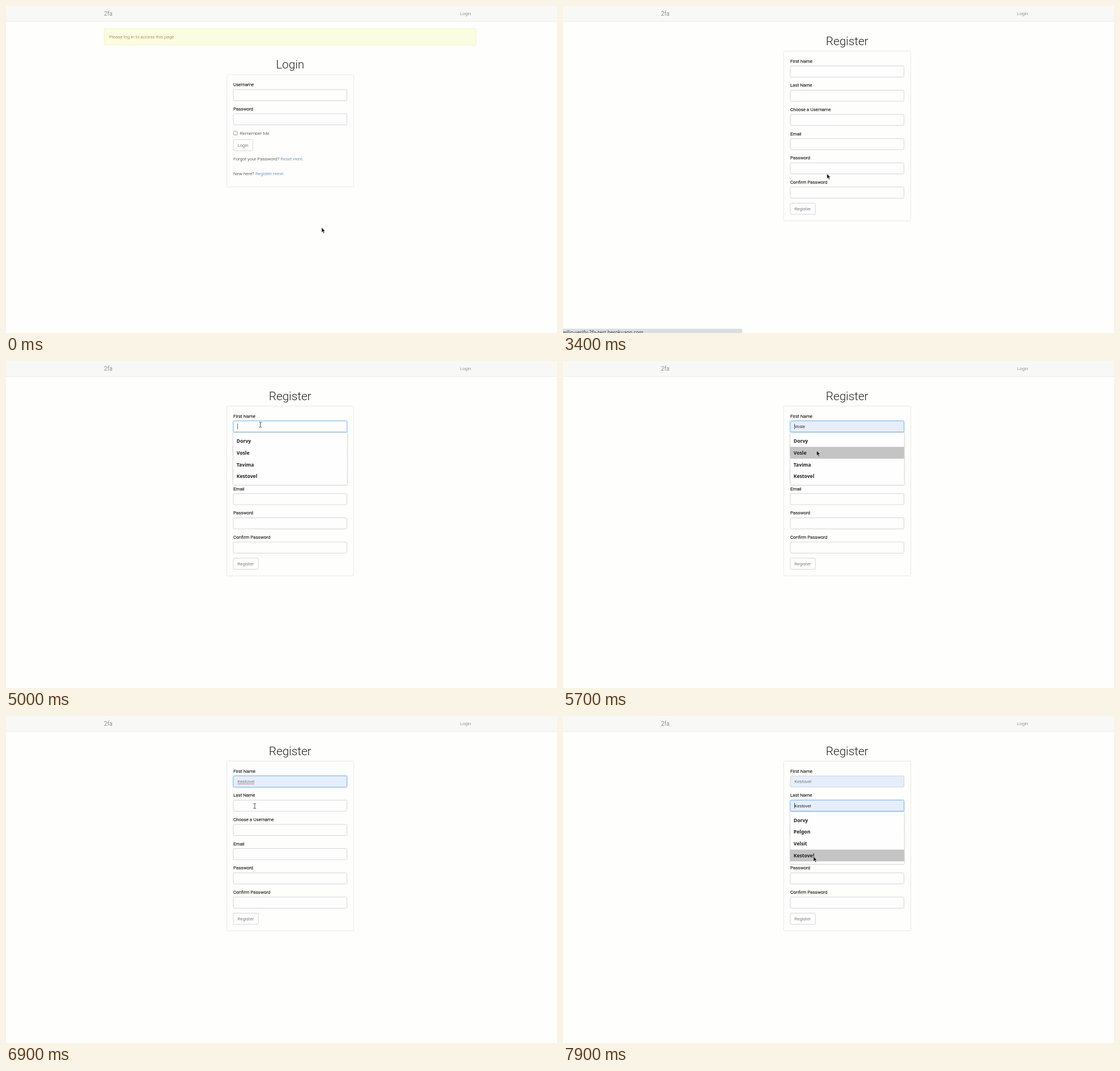
Write an HTML page that moves like this. It is 972 px wide and 576 px high and loops after 8 s.

```html
<!DOCTYPE html>
<html lang="en">
<head>
<meta charset="utf-8">
<title>Register</title>
<style>
html, body { margin: 0; width: 100%; height: 100%; overflow: hidden; background: #fefefd; }
svg { display: block; width: 972px; height: 576px; }
text { font: 300 8.06px Roboto, sans-serif; fill: #222; white-space: pre; }
.title { font-size: 20.7px; text-anchor: middle; }
.brand { font-size: 10.36px; fill: #666; }
.nav { fill: #666; }
.label { stroke: #222; stroke-width: .28px; }
.link { fill: #3b6c9f; }
.hover { fill: #23456a; text-decoration: underline; }
.notice { fill: #85683a; }
.value { fill: #444; }
.preview { font: 7.67px "Liberation Sans", Arial, sans-serif; }
.option { font: 700 8.6px "Noto Sans", "Open Sans", sans-serif; }
.status { font: 400 8.54px "Noto Sans", sans-serif; fill: #3c4043; }
.bar { fill: #f8f8f7; }
.alert { fill: #fafde0; stroke: #eef2c6; stroke-width: .8px; }
.panel { fill: none; stroke: #e4e4e3; stroke-width: .8px; }
.box { fill: #fefefe; stroke: #ccc; stroke-width: .8px; }
.check { fill: #fff; stroke: #777; stroke-width: .7px; }
.filled { fill: #e6eefb; }
.focus { stroke: #74b2e2; filter: drop-shadow(0 0 1.6px rgba(102, 175, 233, .6)); }
.menu { fill: #fefefe; filter: drop-shadow(0 .6px 1px rgba(0, 0, 0, .4)); }
.hot { fill: #c4c4c4; }
</style>
</head>
<body>
<svg id="stage" viewBox="0 0 972 576"></svg>
<script>
const LOOP = 8000, STEP = 100;
const LEFT = 401, WIDTH = 200.4, CENTER = 501.2, INSET = 7.2;
const FIELD_H = 19.6, PITCH = 42.65, ROW = 20.7;
const LOGIN_Y = 147.2, REGISTER_Y = 105.6;
const LABELS = ['First Name', 'Last Name', 'Choose a Username', 'Email', 'Password', 'Confirm Password'];
const CHOICE = 'Kestovel';
const HOST = 'twilio-verify-2fa-test.herokuapp.com';
const MENUS = [
  { field: 0, open: 5000, close: 6300, names: ['Dorvy', 'Vosle', 'Tavima', CHOICE] },
  { field: 1, open: 7300, close: LOOP, names: ['Dorvy', 'Pelgon', 'Velsit', CHOICE] }
];
const HOME = { x: 556.8, y: 390 };
const MOVES = [
  { from: 100, to: 400, x: 459, y: 314 },
  { from: 500, to: 1000, x: 465.6, y: 295.2 },
  { from: 3700, to: 4100, x: 463, y: 259.5 },
  { from: 4200, to: 4500, x: 449, y: 133.5 },
  { from: 4600, to: 4800, x: 448.8, y: 112.2 },
  { from: 5300, to: 6100, x: 446, y: 203.2 },
  { from: 6300, to: 6900, x: 438.8, y: 158.5 },
  { from: 7500, to: 7900, x: 441.8, y: 247.2 }
];

const stage = document.getElementById('stage');
const clamp = v => Math.min(1, Math.max(0, v));
const fieldY = i => REGISTER_Y + i * PITCH;
const menuAt = t => MENUS.find(m => t >= m.open && t < m.close);

const text = (cls, x, y, s) => `<text class="${cls}" x="${x}" y="${y}">${s}</text>`;
const rect = (cls, x, y, w, h, r = 2) =>
  `<rect class="${cls}" x="${x}" y="${y}" width="${w}" height="${h}" rx="${r}"/>`;
const line = (d, color) => `<path d="${d}" fill="none" stroke="${color}" stroke-width=".8"/>`;
const field = (y, label, cls = '') =>
  text('label', LEFT, y - 5.8, label) + rect('box ' + cls, LEFT, y, WIDTH, FIELD_H);
const button = (y, w, label) =>
  rect('box', LEFT, y, w, FIELD_H) + text('value', LEFT + INSET, y + 12.6, label);
const card = (title, y, h) =>
  text('title', CENTER, y - 10.8, title) + rect('panel', 389.3, y, 224.2, h);

const header = rect('bar', 0, 0, 972, 27, 0) + line('M0 27.2H972', '#e7e7e6')
  + text('brand', 173, 16.5, '2fa') + text('nav', 801, 15.8, 'Login');

function loginPage(t) {
  return rect('alert', 173.2, 39.7, 656, 29.3)
    + text('notice', 182, 57.2, 'Please log in to access this page.')
    + card('Login', 121, 197.6)
    + field(LOGIN_Y, 'Username') + field(LOGIN_Y + PITCH, 'Password')
    + rect('check', 401.6, 220.7, 6.6, 6.6, 1.3) + text('', 412.4, 226.8, 'Remember Me')
    + button(235.4, 34.4, 'Login')
    + text('', LEFT, 272.2, 'Forgot your Password? <tspan class="link">Reset Here</tspan>.')
    + text('', LEFT, 298, `New here? <tspan class="${t < 700 ? 'link' : 'hover'}">Register Here!</tspan>.`);
}

function menuView(menu, hot) {
  const top = fieldY(menu.field) + 20.4;
  const width = WIDTH + .4;
  let out = rect('menu', LEFT, top, width, 92.2, 1);
  if (hot >= 0) out += rect('hot', LEFT, top + 4.6 + hot * ROW, width, ROW, 0);
  menu.names.forEach((name, i) => { out += text('option', 406.8, top + 18.1 + i * ROW, name); });
  return out;
}

function registerPage(t, p) {
  const active = t >= 7200 ? 1 : t >= 4900 ? 0 : -1;
  const menu = menuAt(t);
  const hot = menu ? Math.floor((p.y - fieldY(menu.field) - 25) / ROW) : -1;
  let out = card('Register', 79.4, 299);

  LABELS.forEach((label, i) => {
    const y = fieldY(i), x = LEFT + INSET;
    const focused = i === active;
    const preview = menu && menu.field === i && hot >= 0;
    const done = i === 0 && t >= 6300;
    out += field(y, label, (focused ? 'focus ' : '') + (done || preview ? 'filled' : ''));
    if (preview) out += text('preview', x, y + 12.5, menu.names[hot]);
    if (done) out += text('value', x, y + 12.6, CHOICE);
    if (done && focused) out += line(`M${x} ${y + 14.2}h30`, '#b8606a');
    if (focused && !done) out += line(`M${x + .3} ${y + 4.8}v9.6`, '#333');
  });

  out += button(347.3, 44.2, 'Register');
  return menu ? out + menuView(menu, hot) : out;
}

function statusBar(t) {
  const alpha = clamp((t - 700) / 200) * clamp((3900 - t) / 200);
  const message = t < 1400 ? `https://${HOST}/register` : `Waiting for ${HOST}`;
  return `<g opacity="${alpha}"><path d="M0 568.5H314q2.2 0 2.2 2.2V576H0Z" fill="#dadee0"/>`
    + text('status', -50, 577.6, message) + '</g>';
}

function pointerAt(t) {
  return MOVES.reduce((p, m) => {
    const k = clamp((t - m.from) / (m.to - m.from));
    return { x: p.x + (m.x - p.x) * k, y: p.y + (m.y - p.y) * k };
  }, HOME);
}

function pointerView(t, p) {
  const menu = menuAt(t);
  // The shape only updates once the pointer moves on the new page.
  const typing = t > 3700 && LABELS.some((_, i) =>
    p.y > fieldY(i) && p.y < fieldY(i) + FIELD_H && !(menu && i > menu.field));
  const shape = typing
    ? line('M-2.4-4.4Q0-4.6 0-3.4Q0-4.6 2.4-4.4M0-3.6V3.6M-2.4 4.4Q0 4.6 0 3.4Q0 4.6 2.4 4.4', '#222')
    : '<path d="M0 0V9.2L2.1 7.2L3.7 10.8L5.2 10.1L3.6 6.7H6.4Z" fill="#111" stroke="#fff" stroke-width=".6"/>';
  return `<g transform="translate(${p.x} ${p.y})">${shape}</g>`;
}

let shown = -1;
function draw(time) {
  const t = Math.floor(time % LOOP / STEP) * STEP;
  if (t === shown) return;
  shown = t;
  const p = pointerAt(t);
  stage.innerHTML = header + (t < 3400 ? loginPage(t) : registerPage(t, p)) + statusBar(t) + pointerView(t, p);
}

const start = performance.now();
function tick() {
  draw(performance.now() - start);
  requestAnimationFrame(tick);
}
tick();
</script>
</body>
</html>
```
